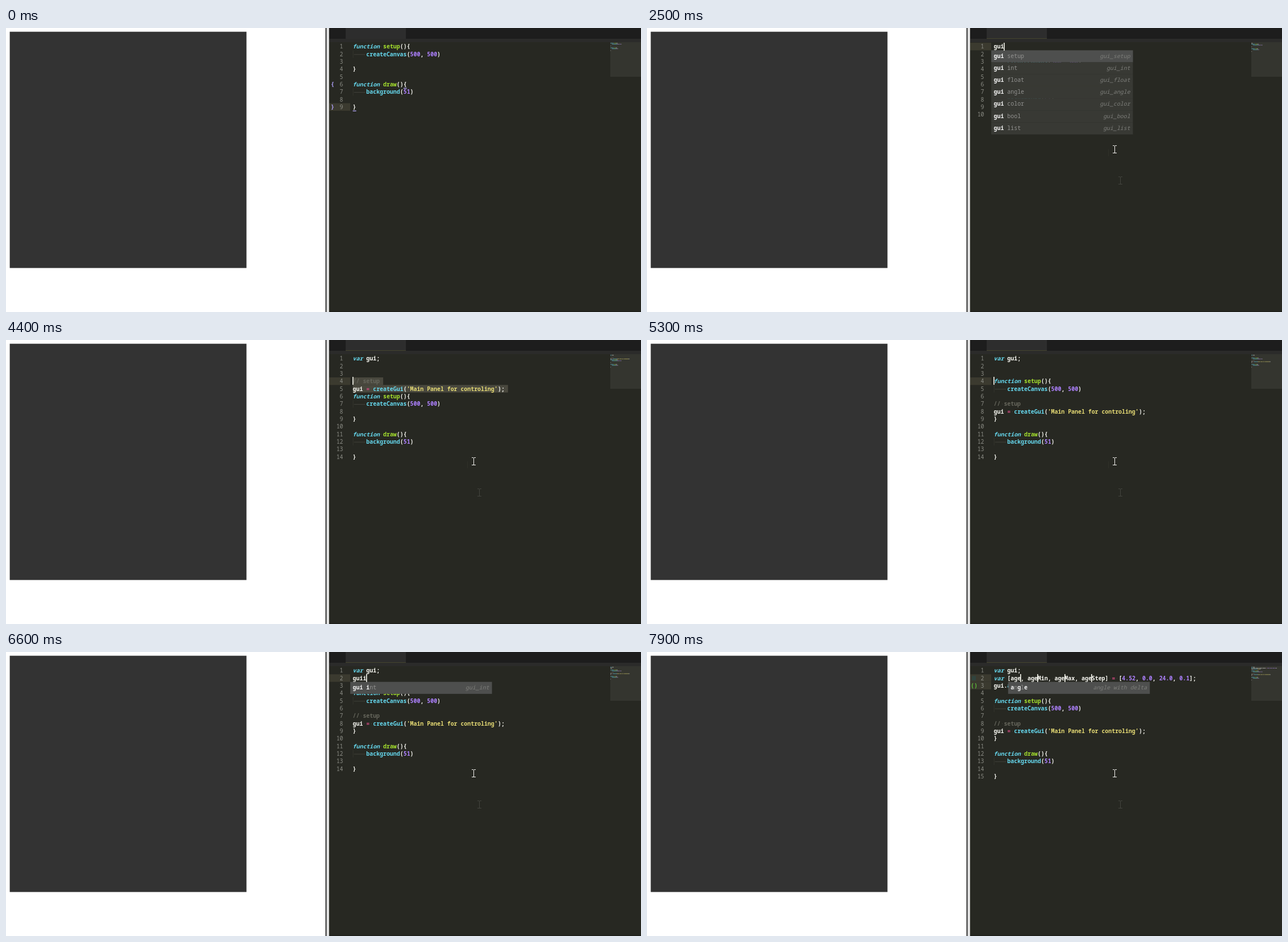
These frames come from a looping animation (1118x501 px, 8000 ms). An HTML page with a canvas:

```html
<!DOCTYPE html>
<html lang="en">
<head>
<meta charset="utf-8">
<title>Code editor</title>
<style>
  html, body { margin: 0; width: 100%; height: 100%; overflow: hidden; background: #fff; }
  canvas { display: block; }
</style>
</head>
<body>
<canvas width="1118" height="501"></canvas>
<script>
const ctx = document.querySelector('canvas').getContext('2d');
const LOOP = 8000, CH = 5.94, ROW = 13.33, LEFT = 610.6, TOP = 26;
const MONO = '9.9px "Noto Sans Mono", "DejaVu Sans Mono", monospace';

// Syntax rules, tried in order: pattern, colour, italic
const RULES = [
  [/^\/\/.*/, '#66665c'],
  [/^'[^']*'/, '#e6db74'],
  [/^(var|function)\b/, '#66d9ef', true],
  [/^(setup|draw)(?=\()/, '#a6e22e'],
  [/^[a-z]\w*(?=\()/i, '#66d9ef'],
  [/^\d[\d.]*/, '#ae81ff'],
  [/^=/, '#c5487a'],
  [/^\w+/, '#f8f8f2'],
  [/^\s+/, null],
  [/^./, '#f8f8f2']
];

// Documents
const setup = ['function setup(){', '\tcreateCanvas(500, 500)', '', '}'];
const draw = ['function draw(){', '\tbackground(51)', '', '}'];
const base = [...setup, '', ...draw];
const block = ['// setup', "gui = createGui('Main Panel for controling');"];
const moved = n => {
  const doc = ['var gui;', '', '', ...base];
  doc.splice(2 + n, 0, ...block);
  return doc;
};
const tail = moved(4).slice(2);
const second = (...lines) => ['var gui;', ...lines, ...tail];
const sliders = n => second(
  `var [${n}, ${n}Min, ${n}Max, ${n}Step] = [4.52, 0.0, 24.0, 0.1];`,
  `gui.addGlobals('${n}');`);
const nameCols = n => [5, 7 + n, 12 + 2 * n, 17 + 3 * n];

// Completion popups
const snippets = ['setup', 'int', 'float', 'angle', 'color', 'bool', 'list', 'text']
  .map(s => ['gui ' + s, 'gui_' + s]);
const words = [['angle', 'angle with delta'], ['age', 'slider'], ['image', 'picture'], ['range', 'min to max']];
const popup = (line, col, typed, items) => ({ popup: { line, col, typed, items } });

const typing = (at, name, items) => [at, sliders(name),
  nameCols(name.length).map(c => [1, c + name.length]),
  { lines: [1, 2], paren: 2, ...(items && popup(2, 5, name, items)) }];
const select = (at, n) => [at, moved(n), [[2 + n, 0]], { sel: [[2 + n, 0, 9], [3 + n, 0, 46]] }];

// Scenes: start, document, carets as [line, column], extras
const scenes = [
  [0, base, [], { lines: [8], marks: [[5, 15, '{'], [8, 0, '}']] }],
  [1100, base, [[0, 0]]],
  [1400, ['', ...base], [[1, 0]]],
  [1500, ['', ...base], [[0, 0]]],
  [2400, ['gu', ...base], [[0, 2]], popup(1, 0, 'gu', snippets.slice(0, 7))],
  [2500, ['gui', ...base], [[0, 3]], popup(1, 0, 'gui', snippets.slice(0, 7))],
  [2800, ['guis', ...base], [[0, 4]], popup(1, 0, 'guis', snippets.slice(0, 1))],
  [3100, moved(0), [[4, 0]]],
  [4000, moved(0), [[3, 0]], { sel: [[3, 0, 46]] }],
  select(4100, 0),
  select(4400, 1),
  select(4500, 2),
  select(4600, 3),
  select(4700, 4),
  [5000, moved(4), [[8, 0]], { marks: [[3, 16, '{'], [8, 0, '}']] }],
  [5300, moved(4), [[3, 0]]],
  [5400, moved(4), [[2, 0]]],
  [5500, moved(4), [[1, 0]]],
  [6200, second('gu'), [[1, 2]], popup(2, 0, 'gu', snippets)],
  [6300, second('gui'), [[1, 3]], popup(2, 0, 'gui', snippets)],
  [6600, second('guii'), [[1, 4]], popup(2, 0, 'guii', snippets.slice(1, 2))],
  [6800, second('guiin'), [[1, 5]], popup(2, 0, 'guiin', snippets.slice(1, 2))],
  [7100, sliders('val'), [], { lines: [1, 2], paren: 2, sel: nameCols(3).map(c => [1, c, c + 3]) }],
  typing(7500, 'a'),
  typing(7600, 'a', words),
  typing(7700, 'ag', words.slice(0, 2)),
  typing(7900, 'age', words.slice(0, 1))
];

const rect = (x, y, w, h, color) => { ctx.fillStyle = color; ctx.fillRect(x, y, w, h); };
const colX = col => LEFT + col * CH;
const rowY = line => TOP + line * ROW;

function text(str, x, y, color, style = '600', align = 'left') {
  ctx.font = style + ' ' + MONO;
  ctx.textAlign = align;
  ctx.fillStyle = color;
  ctx.fillText(str, x, y);
}

function tokens(line) {
  const list = [];
  for (let col = 0; line;) {
    const [rule, str] = RULES.map(r => [r, (line.match(r[0]) || [])[0]]).find(m => m[1]);
    list.push({ str, col, color: rule[1], italic: rule[2] });
    col += str === '\t' ? 4 : str.length;
    line = line.slice(str.length);
  }
  return list;
}

function codeLine(line, i) {
  const y = rowY(i), mid = y + 7;
  text(i + 1, 593.5, y + 10.3, '#8b8c85', '500', 'right');
  tokens(line).forEach(({ str, col, color, italic }) => {
    const x = colX(col);
    if (str === '\t') {
      rect(x, y, 1, ROW, '#35362f');
      rect(x + 2, mid, 20, 1, '#40413a');
      return;
    }
    [...str].forEach((c, k) => {
      if (c === ' ') rect(x + k * CH + 2.5, mid - .5, 1, 1, '#4b4c45');
    });
    if (!color) return;
    text(str, x, y + 10.3, color, italic ? 'italic 600' : '600');
    ctx.globalAlpha = .55;
    for (const m of str.matchAll(/\S+/g))
      rect(1064 + (col + m.index) * .75, 26.4 + i * 1.62, m[0].length * .75, 1, color);
    ctx.globalAlpha = 1;
  });
}

function drawPopup({ line, col, typed, items }) {
  const x = colX(col) - 4.5, top = rowY(line);
  items.forEach(([label, hint], i) => {
    const y = top + i * 21.2, base = y + 13.3;
    let hit = 0;
    rect(x, y, 249.5, 21.2, i ? '#383934' : '#4e4f4e');
    [...label].forEach((c, k) => {
      const match = c === typed[hit];
      if (match) hit++;
      text(c, x + 4.5 + k * CH, base, match ? '#f4f4f4' : '#929290', match ? '600' : '500');
    });
    text(hint, x + 244.5, base, '#7d7e7a', 'italic 500', 'right');
  });
}

function beam(x, y, color) {
  rect(x, y - 6, 1, 13, color);
  [-7, 6].forEach(d => {
    rect(x - 3, y + d, 3, 1, color);
    rect(x + 1, y + d, 3, 1, color);
  });
}

function pointer(t) {
  if (t < 100) return;
  const p = Math.min(1, Math.floor((t - 100) / 100) / 8), q = 1 - p;
  if (p) beam(833, 269, '#44453f');
  if (p > .6 && t < 6200) rect(812, 214, 1, 12, '#303129');
  beam(Math.round(q * q * 833 + 2 * p * q * 800 + p * p * 823),
       Math.round(q * q * 269 + 2 * p * q * 222 + p * p * 214), '#f4f4f0');
}

function frame(t) {
  rect(0, 0, 1118, 501, '#fff');
  rect(6.6, 6.6, 416.8, 416.8, '#333');
  rect(562, 0, 3.3, 501, '#696969');
  rect(565.3, 0, 3.4, 501, '#ededed');
  rect(568.7, 0, 550, 501, '#272822');
  rect(569, 0, 549, 19, '#1d1d1d');
  rect(569, 19, 549, 6, '#2b2b2a');
  rect(598, 0, 106, 19, '#2d2d2d');
  if (t >= 1400) rect(598, 18, 106, 1, '#44442f');
  rect(569, 499, 549, 2, '#20211c');
  rect(1064, 25, 54, 61, '#34352f');

  const [at, doc, carets, { lines, sel = [], marks = [], paren, popup } = {}] =
    scenes.findLast(s => s[0] <= t);
  new Set(lines || carets.map(c => c[0])).forEach(l => rect(569, rowY(l), 37, ROW, '#3b3a2f'));
  sel.forEach(([l, from, to]) => rect(colX(from), rowY(l), (to - from) * CH, ROW, '#49483e'));
  doc.forEach(codeLine);
  marks.forEach(([l, col, c]) => {
    text(c, 572, rowY(l) + 10, '#b3a4ff', 'bold');
    rect(colX(col), rowY(l) + 13, 6, 1.3, '#b9adff');
  });
  if (paren) {
    text('()', 570, rowY(paren) + 10, '#5cc03a', 'bold');
    rect(572, rowY(paren - 1) + 3, 7, 8, '#30443e');
  }
  if (popup) drawPopup(popup);

  // Carets hold, then fade out
  ctx.globalAlpha = Math.max(0, Math.min(1, 1 - (Math.floor((t - at) / 100) - 2) / 3));
  carets.forEach(([l, col]) => rect(Math.round(colX(col) - .8), Math.round(rowY(l) - .5), 1.6, 14, '#f8f8f0'));
  ctx.globalAlpha = 1;
  pointer(t);
}

const start = performance.now();
(function tick() {
  frame((performance.now() - start) % LOOP);
  requestAnimationFrame(tick);
})();
</script>
</body>
</html>
```
